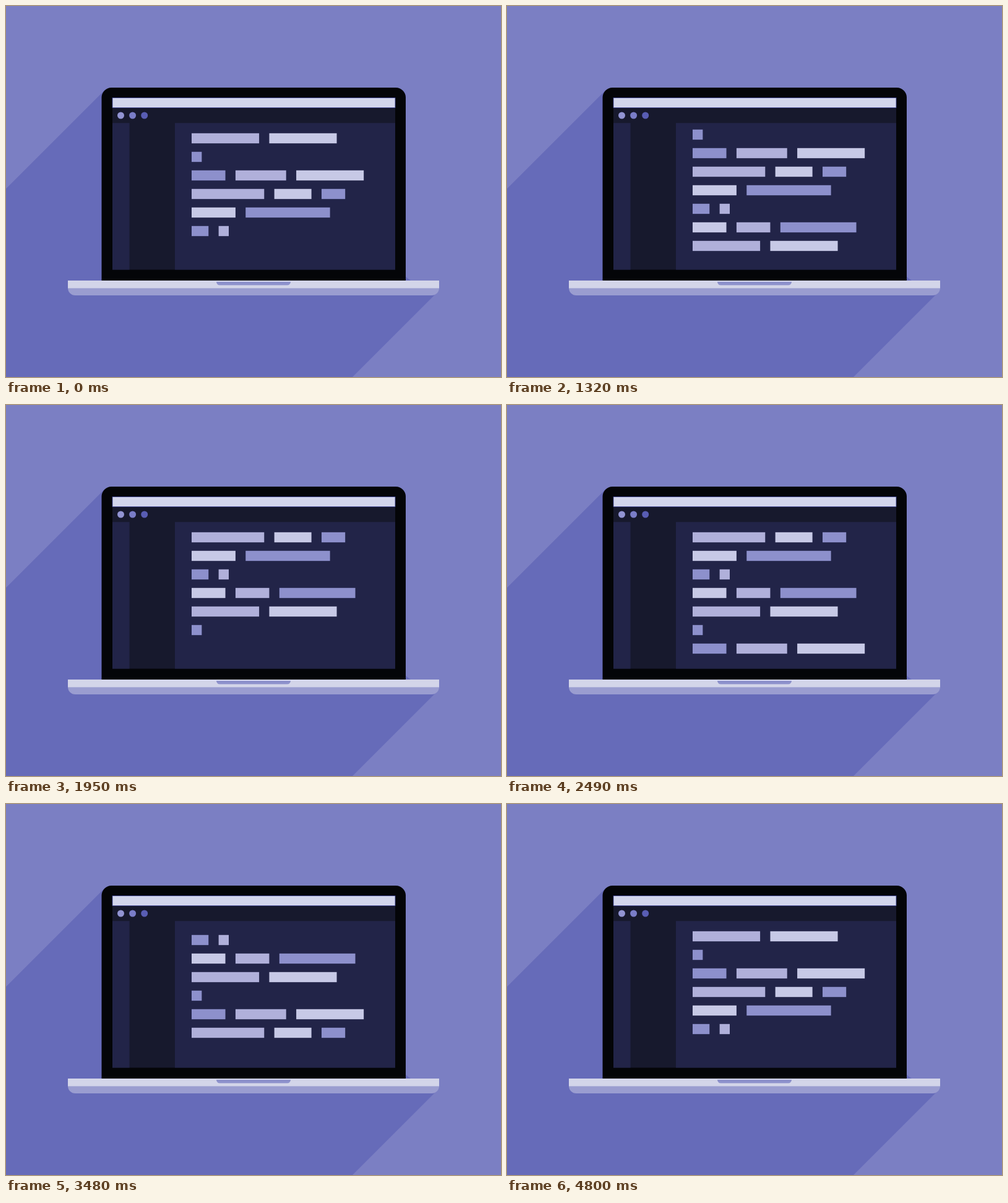
Write an HTML page with a canvas that moves like this. It is 800 px wide and 600 px high and loops after 4830 ms.

```html
<!DOCTYPE html>
<html>
<head>
<meta charset="utf-8">
<title>Typing laptop</title>
<style>
  html, body { margin: 0; width: 100%; height: 100%; overflow: hidden; background: #7b7fc3; }
  svg, canvas { position: absolute; left: 0; top: 0; }
</style>
</head>
<body>
<svg width="800" height="600" viewBox="0 0 800 600">
  <rect width="800" height="600" fill="#7b7fc3"/>
  <path d="M160 135.5L0 295.5V600H560L695 465L654 444L646 438Z" fill="#666bb9"/>
  <path d="M154.5 444V148a16 16 0 0 1 16-16H630a16 16 0 0 1 16 16V444Z" fill="#040508"/>
  <rect x="172" y="148.5" width="457" height="278" fill="#17192d"/>
  <rect x="172" y="148.5" width="457" height="16" fill="#d3d6ec" stroke="#3a4194" stroke-width=".8"/>
  <path d="M172 189.3h27.5V426.5H172ZM273 189.3H629V426.5H273Z" fill="#222448"/>
  <circle cx="185.5" cy="177" r="5.5" fill="#9294d2"/>
  <circle cx="204.6" cy="177" r="5.5" fill="#7a7dc8"/>
  <circle cx="223.7" cy="177" r="5.5" fill="#595db3"/>
  <path d="M100 456H700a12 12 0 0 1-12 12H112a12 12 0 0 1-12-12Z" fill="#9a9dd0"/>
  <rect x="100" y="444" width="600" height="12.4" fill="#d3d5e9"/>
  <path d="M340 446H460a5.5 5.5 0 0 1-5.5 5.5H345.5a5.5 5.5 0 0 1-5.5-5.5Z" fill="#8d91cc"/>
</svg>
<canvas id="code" width="800" height="600"></canvas>
<script>
const ctx = document.getElementById('code').getContext('2d');
const UNIT = 12 / 11, LEFT = 300, TOP = 205.8, BAR = 15 * UNIT, PITCH = 30;
const TICK = 30, LOOP = 161, SCROLL = 5, PAUSE = 3;
const COLORS = { l: '#c7c9e6', m: '#b0b0da', p: '#8d90cc' };

// Each line: words as colour + width, in the order they are typed.
const lines = [
  'l50 m50 p112.5',
  'm100 l100',
  'p15',
  'p50 m75 l100',
  'm107.5 l55 p35',
  'l65 p125',
  'p25 m15'
].map(text => {
  let x = LEFT;
  const words = text.split(' ').map(word => {
    const w = word.slice(1) * UNIT;
    const item = { x, w, color: COLORS[word[0]], steps: w > 100 ? 5 : 2 };
    x += w + BAR;
    return item;
  });
  return { words, hold: x < 400 ? 7 : 3 };
});

// Lay the typing and scrolling out on one timeline of ticks.
let clock = 1;
for (const line of lines) {
  for (const word of line.words) {
    word.start = clock;
    clock += word.steps + PAUSE;
  }
  line.scroll = clock - PAUSE + line.hold;
  line.done = line.scroll + SCROLL;
  clock = line.done + PAUSE;
}

function drawLine(line, y, tick = Infinity) {
  for (const { x, w, color, steps, start } of line.words) {
    if (tick < start) continue;
    const grown = Math.min((tick - start) / steps, 1);
    ctx.fillStyle = grown ? color : '#8f95dc';
    ctx.fillRect(x, y, Math.max(2, w * grown), BAR);
  }
}

function draw(now) {
  let tick = Math.floor(now / TICK) % LOOP;
  let current = lines.findIndex(line => tick < line.done);
  if (current < 0) {
    current = 0;
    tick -= LOOP;
  }
  const moved = Math.max(0, tick - lines[current].scroll);
  const rowY = row => TOP + row * PITCH - moved * PITCH / SCROLL;

  ctx.clearRect(0, 0, 800, 600);
  // The top line disappears right after it starts to move.
  for (let row = moved > 1 ? 1 : 0; row < 6; row++)
    drawLine(lines[(current + 1 + row) % 7], rowY(row));
  drawLine(lines[current], rowY(6), tick);
}

const origin = performance.now();
function frame() {
  draw(performance.now() - origin);
  requestAnimationFrame(frame);
}
frame();
</script>
</body>
</html>
```
